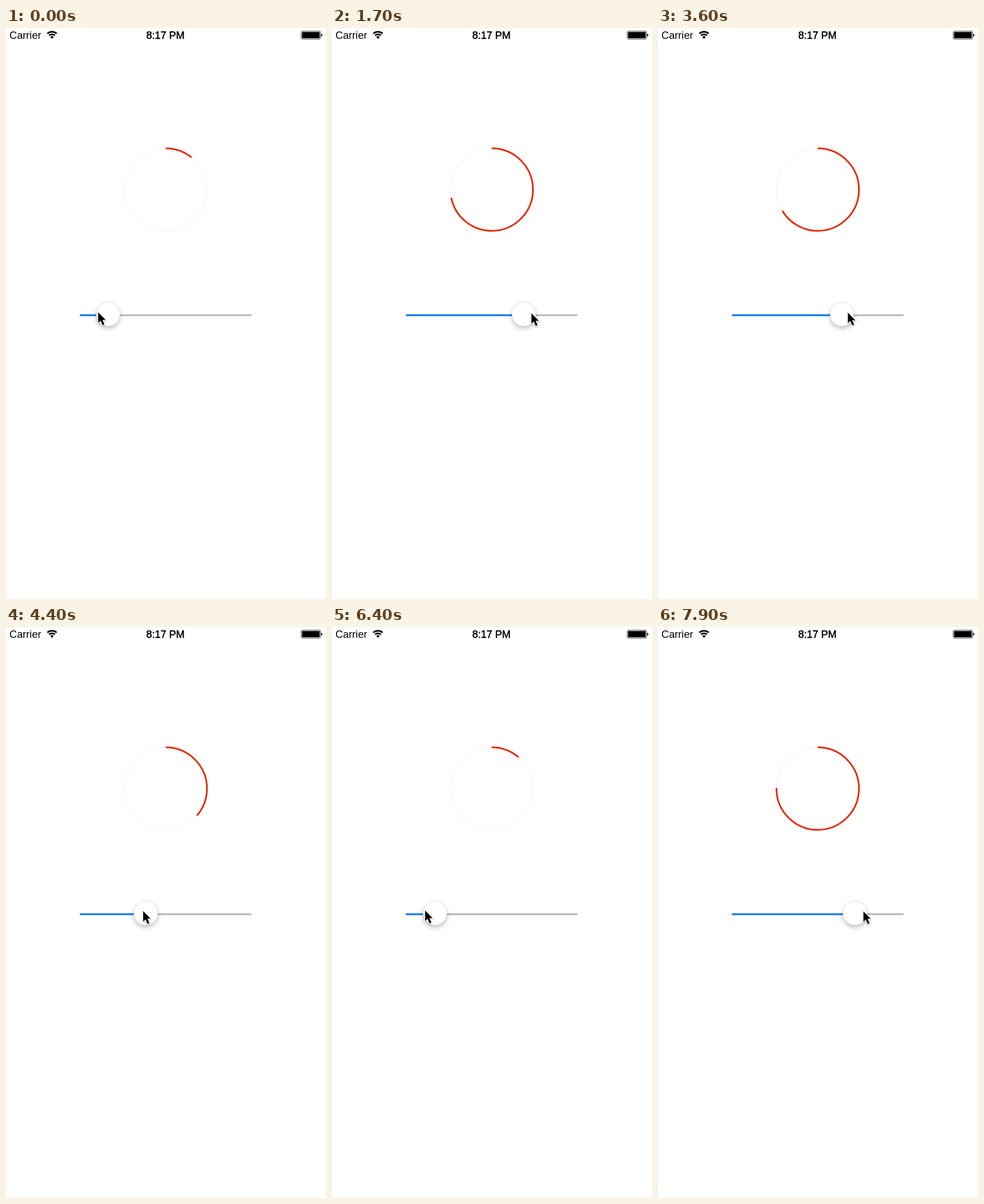
These frames come from a looping animation (560x1000 px, 8 s). An HTML page:

```html
<!DOCTYPE html>
<html lang="en">
<head>
<meta charset="utf-8">
<title>Progress ring</title>
<style>
  html, body { margin: 0; width: 100%; height: 100%; overflow: hidden; background: #fff; }
  svg { display: block; width: 560px; height: 1000px; }
  text { font-family: "Liberation Sans", Arial, sans-serif; font-size: 18.2px; }
  .medium { font-size: 18px; text-anchor: middle; stroke: #000; stroke-width: .55; }
  .ring { fill: none; stroke-width: 3; }
  .track { stroke-width: 3; stroke-linecap: round; }
  #thumb circle { filter: drop-shadow(0 4px 4px rgba(0, 0, 0, .24)); }
  #cursor path { filter: drop-shadow(0 1px 1px rgba(0, 0, 0, .3)); }
</style>
</head>
<body>
<svg viewBox="0 0 560 1000">
  <text x="6" y="19">Carrier</text>
  <g transform="translate(80.5 19)">
    <path d="M-8.2 -9.2A12.3 12.3 0 0 1 8.2 -9.2M-5.2 -5.9A7.9 7.9 0 0 1 5.2 -5.9" fill="none" stroke="#000" stroke-width="2.6"/>
    <path d="M0 0L-3 -3.4A4.5 4.5 0 0 1 3 -3.4Z"/>
  </g>
  <text class="medium" x="279" y="19">8:17 PM</text>
  <rect x="516.5" y="5.5" width="34" height="14" rx="2.5" fill="none" stroke="#000" stroke-width=".75"/>
  <rect x="518" y="7" width="31" height="11" rx="1"/>
  <path d="M551.5 10a2 2.5 0 0 1 0 5z"/>

  <circle class="ring" cx="279.5" cy="283" r="72.2" stroke="#fafafa"/>
  <circle id="arc" class="ring" cx="279.5" cy="283" r="72.2" stroke="#e03010" pathLength="1" transform="rotate(-90 279.5 283)"/>

  <path class="track" d="M130.5 503H428.5" stroke="#b6b6b6"/>
  <line id="filled" class="track" x1="130.5" y1="503" x2="130.5" y2="503" stroke="#0b7dff"/>
  <g id="thumb"><circle cy="501.3" r="21" fill="#fff" stroke="#000" stroke-opacity=".12" stroke-width=".7"/></g>
  <g id="cursor"><path d="M0 0V18.4L4.2 14.5L7.6 22.4L10.9 21L7.5 13.2H13Z" stroke="#fff" stroke-width="2.4" paint-order="stroke"/></g>
</svg>
<script>
  const LOOP = 8000, STEP = 100;
  // Turning points of the drag as [time, value]; beyond 0..1 only the cursor keeps moving.
  const PAST_START = -.02, PAST_END = 1.007;
  const turns = [[0, .107], [1700, .718], [2430, PAST_END], [2800, PAST_END],
    [3600, .664], [5420, PAST_START], [6090, PAST_START], [LOOP, .795]];

  const [arc, filled, thumb, cursor] = ['arc', 'filled', 'thumb', 'cursor'].map(id => document.getElementById(id));

  function dragAt(time) {
    const next = turns.findIndex(turn => turn[0] > time);
    const [t0, v0] = turns[next - 1], [t1, v1] = turns[next];
    return v0 + (v1 - v0) * (time - t0) / (t1 - t0);
  }

  const moveTo = (node, x, y) => node.setAttribute('transform', `translate(${x} ${y})`);

  function draw(elapsed) {
    const time = Math.floor(elapsed % LOOP / STEP) * STEP;
    const drag = dragAt(time);
    const progress = Math.min(1, Math.max(0, drag));
    const thumbX = 151.2 + 257 * progress;
    const sway = 1.5 * Math.sin(2 * Math.PI * time / LOOP);
    arc.setAttribute('stroke-dasharray', `${progress} 2`);
    filled.setAttribute('x2', thumbX);
    moveTo(thumb, thumbX, 0);
    moveTo(cursor, 128.5 + 307 * drag, 498 + sway);
  }

  const start = performance.now();
  function tick() {
    draw(performance.now() - start);
    requestAnimationFrame(tick);
  }
  tick();
</script>
</body>
</html>
```
